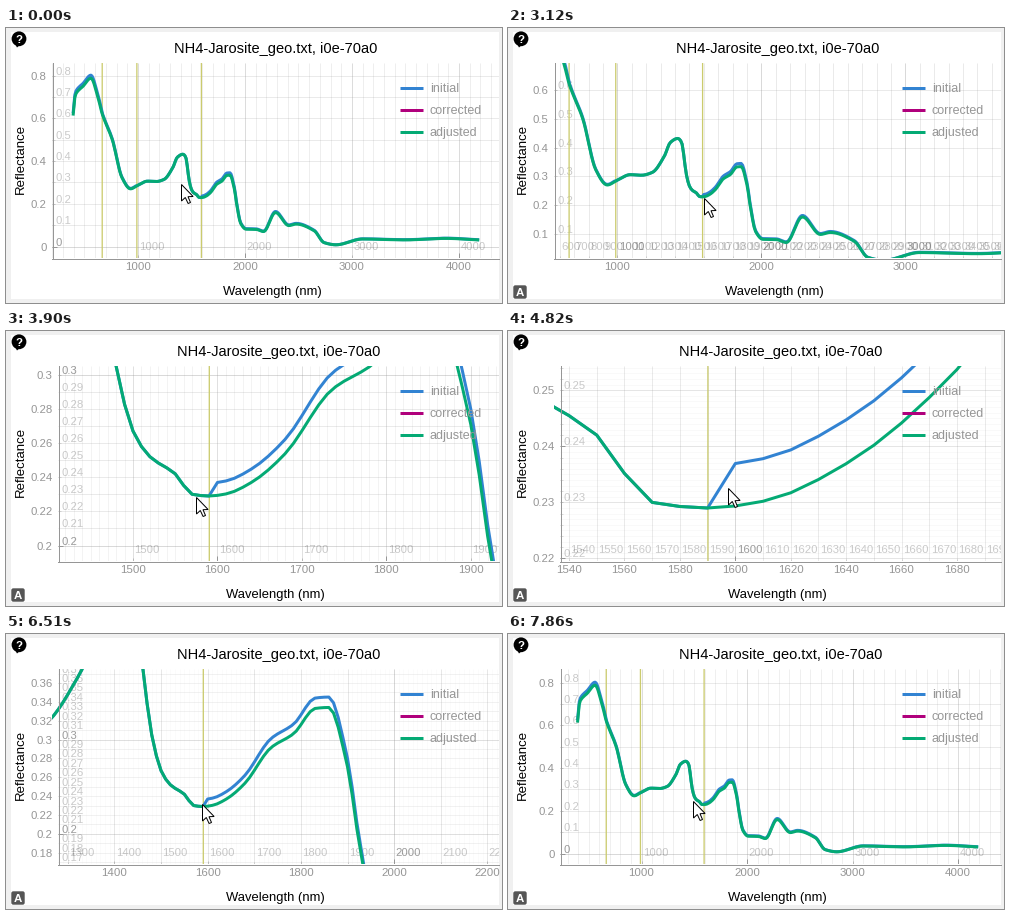
Recreate the animation shown at these times as a matplotlib script. Size 496 by 275 pixels, loop 8000 ms.

```python
import math

import numpy as np
import matplotlib.pyplot as plt
from matplotlib.animation import FuncAnimation
from matplotlib.collections import LineCollection
from matplotlib.patches import Circle, FancyBboxPatch, Polygon, Rectangle

W, H, DPI = 496, 275, 100
LOOP, STEP = 8000, 40
PX = 72 / DPI
TOP, BOTTOM, RIGHT = 35, 230, 493
BLUE, PURPLE, GREEN = "#3283d2", "#b0007c", "#04aa74"
GRAY = (150 / 255,) * 3
OLIVE = (203 / 255, 203 / 255, 110 / 255)
NOTCH = 1.02 ** 15          # zoom factor of one wheel notch
FOCUS = (1590, 0.229)       # data point the view is placed by

plt.rcParams["font.family"] = "Liberation Sans"

# ---- spectrum: bends and turning points, (nm, reflectance) ----------------
SHAPE = np.array([
    (395, .62), (415, .71), (490, .752), (560, .788), (625, .7), (665, .622),
    (690, .588), (760, .5), (850, .323), (930, .27), (1000, .287),
    (1090, .306), (1167, .304), (1243, .314), (1326, .37), (1368, .418),
    (1420, .432), (1445, .42), (1480, .305), (1500, .267), (1520, .252),
    (1550, .242), (1570, .23), (1590, .229), (1610, .2302), (1640, .2369),
    (1680, .2537), (1735, .291), (1785, .3065), (1831, .333), (1860, .334),
    (1900, .271), (1925, .19), (1960, .108), (2010, .081), (2104, .08),
    (2174, .07), (2285, .159), (2410, .098), (2479, .105), (2646, .074),
    (2740, .018), (2850, .008), (3100, .035), (3500, .031), (3878, .038),
    (4175, .031)])


def smooth(x, px, py):
    """Monotone cubic curve through the points."""
    h = np.diff(px)
    rise = np.diff(py) / h
    a, b = rise[:-1], rise[1:]
    turn = a * b <= 0
    slope = np.r_[rise[0], np.where(turn, 0, 2 * a * b / np.where(turn, 1, a + b)),
                  rise[-1]]
    k = np.clip(np.searchsorted(px, x, side="right") - 1, 0, len(h) - 1)
    u = (x - px[k]) / h[k]
    v = 1 - u
    return ((1 + 2 * u) * v * v * py[k] + u * v * v * h[k] * slope[k]
            + u * u * (3 - 2 * u) * py[k + 1] - u * u * v * h[k] * slope[k + 1])


JOINTS = (663, 987, 1590)
nm = np.r_[395, np.arange(400, 4171, 10), 4175].astype(float)
adjusted = smooth(nm, *SHAPE.T)
initial = adjusted * np.array([1.018, 1.008, 1, 1.033])[np.searchsorted(JOINTS, nm)]

# ---- timeline -------------------------------------------------------------
# the picture changes in bursts of even steps: first, last, count
BURSTS = [(0, 0, 1), (120, 1000, 8), (1170, 1170, 1), (1450, 2420, 8),
          (2540, 2720, 2), (3120, 4160, 9), (4280, 5120, 7), (5400, 5820, 4),
          (6100, 6510, 4), (6770, 6910, 2), (7170, 7570, 2), (7860, 7860, 1)]
TICKS = np.concatenate([np.linspace(*b) for b in BURSTS])

CURSOR = [(0, 175, 156), (250, 164, 132), (500, 184, 137), (1000, 195, 162),
          (1170, 195, 170), (1590, 184, 141), (2000, 203, 174),
          (2420, 191, 157), (2720, 196, 170), (3120, 196, 170),
          (3900, 190, 166), (4840, 220, 157), (5260, 220, 157),
          (6510, 196, 170), (7570, 196, 169), (7860, 185, 167)]
ZOOM = [(2990, 0), (3900, 7), (4840, 11), (5120, 13), (5260, 13), (6510, 5),
        (7300, 0)]
ANCHOR = [(2990, 195.1, 169.6), (3120, 194.3, 168.8), (3900, 203, 165),
          (4840, 199.6, 177), (5120, 183, 193), (6510, 197, 172.5),
          (7570, 195.8, 170.6)]
ZOOM_START, WIDE_LABELS = 3000, 3600


def lerp(t, keys):
    when, *tracks = zip(*keys)
    return [np.interp(t, when, track) for track in tracks]


# ---- fixed parts ----------------------------------------------------------
fig = plt.figure(figsize=(W / DPI, H / DPI), dpi=DPI, facecolor="#f0f0f0")
ax = fig.add_axes([0, 0, 1, 1])
ax.set(xlim=(0, W), ylim=(H, 0))
ax.axis("off")


def label(x, y, text, size, color="black", **kw):
    return ax.text(x, y, text, fontsize=size * PX, color=color, **kw)


def stroke(color, width, z, **kw):
    return ax.plot([], [], color=color, lw=width * PX, zorder=z, **kw)[0]


ax.add_patch(Rectangle((5, 4), 488, 267, fc="white", lw=0, zorder=0))
ax.add_patch(Circle((13, 10.8), 7.4, fc="black", lw=0, zorder=8))
ax.add_patch(Polygon([(8.5, 15), (15, 16), (11, 19.5)], fc="black", lw=0, zorder=8))
label(13, 14.9, "?", 11.5, "white", ha="center", weight="bold", zorder=9)

title = label(269, 25, "NH4-Jarosite_geo.txt, i0e-70a0", 14.6, ha="center")
x_label = label(266.5, 267.5, "Wavelength (nm)", 13, ha="center")
label(18, 131, "Reflectance", 13.2, ha="center", va="baseline", rotation=90,
      rotation_mode="anchor")

for row, (name, color) in enumerate(
        [("initial", BLUE), ("corrected", PURPLE), ("adjusted", GREEN)]):
    y = 59.5 + 22 * row
    stroke(color, 3, 6, solid_capstyle="butt").set_data([394, 417], [y, y])
    label(424, y + 4.5, name, 12.5, GRAY, zorder=6)

auto_button = [
    ax.add_patch(FancyBboxPatch((7, 259), 10, 10, fc="#555555", lw=0, zorder=8,
                                boxstyle="round,pad=1.7,rounding_size=2")),
    label(12, 268.2, "A", 11.5, "white", ha="center", weight="bold", zorder=9)]

window = ax.add_patch(Rectangle((46, TOP), RIGHT - 46, BOTTOM - TOP, fc="none", lw=0))
curves = [stroke(c, 3, 4, solid_joinstyle="round") for c in (BLUE, GREEN)]
marks = [stroke(OLIVE, 1.3, 3, snap=False) for _ in JOINTS]
for line in curves + marks:
    line.set_clip_path(window)
spines = [stroke(GRAY, 1, 5) for _ in range(2)]
ARROW = np.array([(0, 0), (0, 16.5), (3.8, 13), (6.6, 19), (9, 18), (6.5, 12.2),
                  (11.6, 12)])
arrow = ax.add_patch(Polygon(ARROW, fc="white", ec="black", lw=PX, zorder=20,
                             joinstyle="miter"))
loose = []


# ---- axes and grid --------------------------------------------------------
def multiples(step, lo, hi):
    return [k * step for k in range(math.ceil(lo / step), math.floor(hi / step) + 1)]


def tick_levels(lo, hi, size):
    """Tick values from coarse to fine, each value once."""
    best = (hi - lo) / max(2, math.log(size))
    unit = 10 ** math.floor(math.log10(best))
    steps = [unit * m for m in (1, 2, 10, 20, 100)]
    k = 0
    while steps[k + 1] <= best:
        k += 1
    use = [steps[k + 2], steps[k + 1]]
    if (hi - lo) / steps[k] <= size / min(size / 20, 30):
        use.append(steps[k])
    seen, levels = [], []
    for step in use:
        new = [v for v in multiples(step, lo, hi)
               if all(abs(v - s) > step * .01 for s in seen)]
        seen += new
        levels.append(new)
    return levels


def labelled(levels, size, extent):
    """Values that get a label: finer levels only while there is room."""
    shown = []
    for i, level in enumerate(levels):
        fill = sum(extent(v) for v in shown + level) / size
        if i and any(len(shown) >= n and fill >= .8 - n / 10 for n in (0, 2, 4, 6)):
            break
        shown += level
    return shown


def add_lines(segments, alpha, z=1):
    if segments:
        part = LineCollection(segments, colors=[GRAY + (alpha,)],
                              linewidths=PX, zorder=z)
        ax.add_collection(part, autolim=False)
        part.set_clip_path(window)
        loose.append(part)


def add_grid(lo, hi, size, place, segment, text_at):
    for i in (2, 1, 0):
        step = 10.0 ** math.floor(math.log10((hi - lo) / 10 ** i) + .5)
        alpha = min(max(5 * (size * step / (hi - lo) - 3), 0), 50) / 255
        if alpha == 0:
            continue
        values = multiples(step, lo, hi)
        add_lines([segment(place(v)) for v in values], alpha)
        for v in values if i < 2 else []:
            text = label(*text_at(place(v)), f"{v:g}", 11.2, alpha=.21,
                         zorder=2, clip_on=True)
            text.set_clip_path(window)
            loose.append(text)


def add_ticks(levels, place, segment):
    for i, level in enumerate(levels):
        add_lines([segment(place(v), 5 / (i * .5 + 1)) for v in level],
                  1 / (i + 1), z=2)


def update(i):
    now = TICKS[TICKS <= (i + 1) * STEP][-1]
    left = 52 if now > WIDE_LABELS else 46
    wide, tall = RIGHT - left, BOTTOM - TOP
    zoom = NOTCH ** round(lerp(now, ZOOM)[0])
    sx, sy = .107 * wide / 447 * zoom, 213.6 * zoom
    x0, y0 = lerp(now, ANCHOR)

    def px(v):
        return x0 + (v - FOCUS[0]) * sx

    def py(v):
        return y0 - (v - FOCUS[1]) * sy

    x_lo, x_hi = (FOCUS[0] + (e - x0) / sx for e in (left, RIGHT))
    y_lo, y_hi = (FOCUS[1] + (y0 - e) / sy for e in (BOTTOM, TOP))

    while loose:
        loose.pop().remove()
    window.set_bounds(left, TOP, wide, tall)
    middle = (left + RIGHT) / 2
    title.set_x(middle - .3)
    x_label.set_x(middle - 3)
    for part in auto_button:
        part.set_visible(now > ZOOM_START)

    add_grid(x_lo, x_hi, wide, px, lambda p: [(p, TOP), (p, BOTTOM)],
             lambda p: (p + 1.5, BOTTOM - 8))
    add_grid(y_lo, y_hi, tall, py, lambda p: [(left, p), (RIGHT, p)],
             lambda p: (left + 3, p - 1))

    x_levels = tick_levels(x_lo, x_hi, wide)
    y_levels = tick_levels(y_lo, y_hi, tall)
    add_ticks(x_levels, px, lambda p, n: [(p, BOTTOM), (p, BOTTOM - n)])
    add_ticks(y_levels, py, lambda p, n: [(left, p), (left + n, p)])
    for v in labelled(x_levels, wide, lambda v: 6.3 * len(f"{v:g}")):
        loose.append(label(px(v), 242, f"{v:g}", 11.5, GRAY, ha="center"))
    for v in labelled(y_levels, tall, lambda v: 10.4):
        loose.append(label(left - 5.5, py(v) + 4, f"{v:g}", 11.4, GRAY, ha="right"))

    for line, data in zip(curves, (initial, adjusted)):
        line.set_data(px(nm), py(data))
    for mark, v in zip(marks, JOINTS):
        mark.set_data([px(v) + .3] * 2, [TOP, BOTTOM])
    spines[0].set_data([left + .5] * 2, [TOP, BOTTOM + .5])
    spines[1].set_data([left, RIGHT], [BOTTOM + .5] * 2)
    arrow.set_xy(ARROW + np.array(lerp(now, CURSOR)) + .5)
    return []


anim = FuncAnimation(fig, update, frames=LOOP // STEP, interval=STEP,
                     init_func=lambda: [], repeat=True, repeat_delay=0, blit=False)
plt.show()
```
